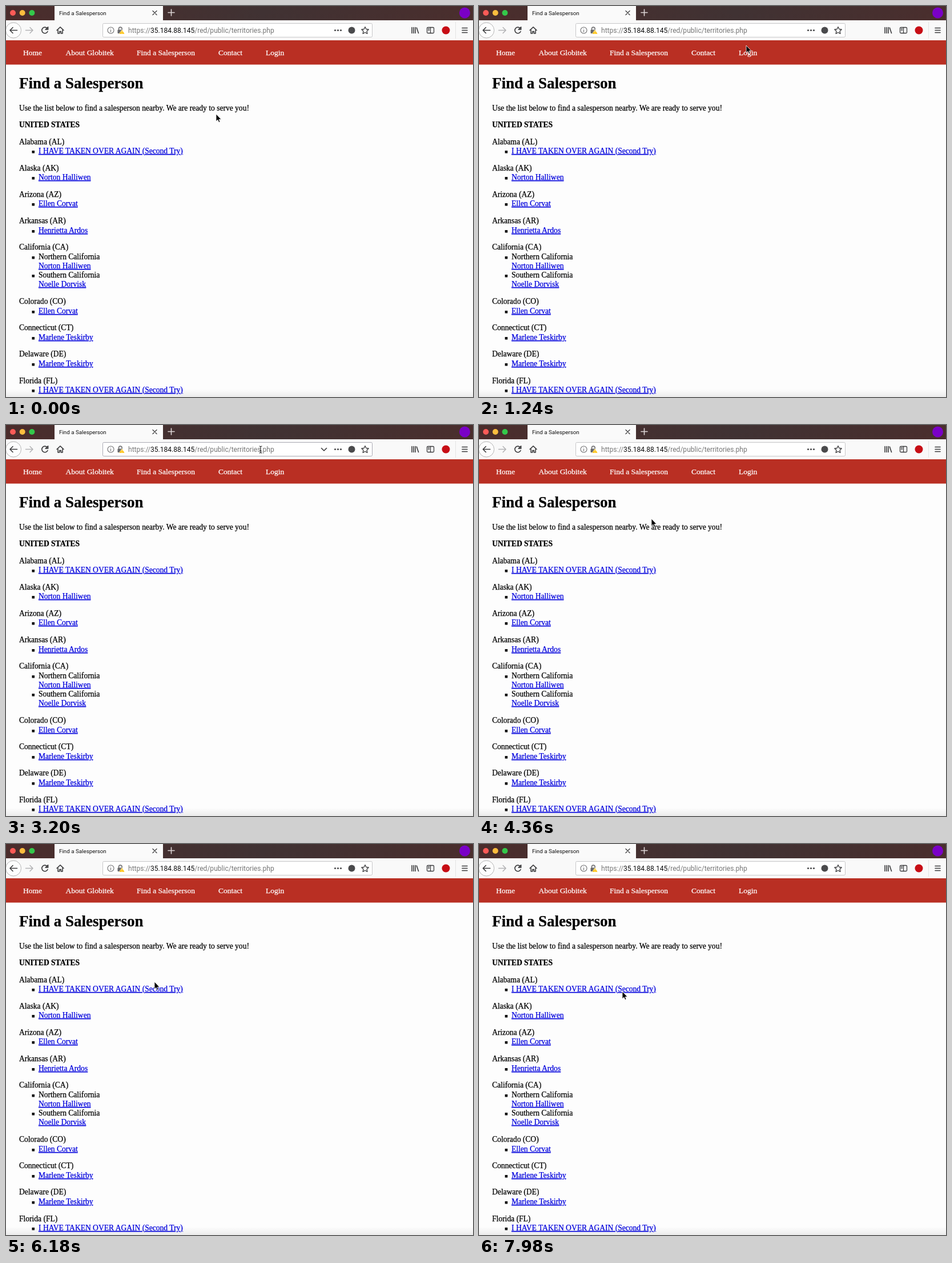
Animation of 818 by 684 pixels, one loop 8000 ms. Source, as an HTML page:

```html
<!DOCTYPE html>
<html lang="en">
<head>
<meta charset="utf-8">
<title>Find a Salesperson</title>
<style>
  html, body { margin: 0; width: 100%; height: 100%; overflow: hidden; background: #fdfdfd; }
  svg { display: block; }
  .ui { font-family: Roboto, sans-serif; }
  #page { font: 13.55px "Liberation Serif", serif; }
  #page text { stroke: #000; stroke-width: .25; }
  #page .menu { fill: #fff; stroke: #fff; font-size: 13.5px; }
  #page .link { fill: #0000dc; stroke: #0000dc; text-decoration: underline; }
  .icon { fill: none; stroke: #3c3c3e; stroke-width: 1.6; stroke-linecap: round; stroke-linejoin: round; }
  .thin { stroke-width: 1.3; }
</style>
</head>
<body>
<svg width="818" height="684" viewBox="0 0 818 684">
  <defs>
    <linearGradient id="titlebar">
      <stop offset="0" stop-color="#4b2d2c"/>
      <stop offset=".55" stop-color="#403233"/>
      <stop offset="1" stop-color="#4a2e2d"/>
    </linearGradient>
    <linearGradient id="bottomShade" x2="0" y2="1">
      <stop offset="0" stop-color="#fdfdfd"/>
      <stop offset="1" stop-color="#ebebeb"/>
    </linearGradient>
  </defs>
  <rect width="818" height="684" fill="#fdfdfd"/>
  <rect y="670" width="818" height="14" fill="url(#bottomShade)"/>

  <!-- Tab strip -->
  <rect width="818" height="25" fill="url(#titlebar)"/>
  <rect x="85" width="190" height="25" fill="#fafafa"/>
  <circle cx="12" cy="12" r="5" fill="#fc5b57"/>
  <circle cx="28.7" cy="12" r="5" fill="#fdbd3e"/>
  <circle cx="45.4" cy="12" r="5" fill="#34c84a"/>
  <text class="ui" x="93" y="15.5" font-size="9.8" fill="#111">Find a Salesperson</text>
  <path class="icon thin" d="M257 8.5l7 7m0-7l-7 7"/>
  <path class="icon" style="stroke:#ddd6d6" d="M284 11.5h11m-5.5-5.5v11"/>
  <circle cx="803.5" cy="12" r="9.5" fill="#7a00c6"/>

  <!-- Toolbar -->
  <rect y="25" width="818" height="35" fill="#f9f9f9"/>
  <circle cx="13" cy="42.5" r="13.5" fill="#fdfdfd" stroke="#b4b4b4"/>
  <path class="icon" d="M19.5 42.5H7m5-5l-5 5 5 5"/>
  <path class="icon" style="stroke:#b4b4b6" d="M34.5 42.5H47m-5-5l5 5-5 5"/>
  <path class="icon" d="M72.3 39.2A5.3 5.3 0 1 0 73 44.5M73.6 36.8v4.4h-4.4z"/>
  <path class="icon" d="M89 42.5l6-5.6 6 5.6M91 42v6h2.7v-3.4h2.6V48H99v-6"/>
  <rect id="urlBox" x="169.5" y="30.5" width="472" height="24" rx="2" fill="#fff" stroke="#c6c6c8"/>
  <g class="icon" style="stroke:#68686a;stroke-width:1.1">
    <circle cx="183.5" cy="42.5" r="5.5"/>
    <path d="M183.5 42v3.3m0-5.6v.1"/>
  </g>
  <path d="M197.5 42v-2.2a2.8 2.8 0 0 1 5.6 0V42" fill="none" stroke="#68686a" stroke-width="1.5"/>
  <rect x="195.5" y="41.5" width="8.5" height="6.5" rx="1" fill="#68686a"/>
  <path d="M203 41.5l5 7.5h-10z" fill="#ffbf00" stroke="#fff" stroke-width=".6"/>
  <path d="M203 44v2.3m0 1v.9" stroke="#fff"/>
  <text class="ui" x="214" y="47" font-size="12.05" fill="#777">https://<tspan fill="#0c0c0d">35.184.88.145</tspan>/red/public/territories.php</text>
  <path id="chevron" class="icon" d="M552.5 40.5l4.5 4.5 4.5-4.5"/>
  <g fill="#4a4a4c">
    <circle cx="576.5" cy="42.5" r="1.6"/>
    <circle cx="581.5" cy="42.5" r="1.6"/>
    <circle cx="586.5" cy="42.5" r="1.6"/>
    <circle cx="605.5" cy="42.5" r="6"/>
  </g>
  <path class="icon thin" d="M629 36.5l1.9 4 4.3.5-3.2 3 .9 4.4-3.9-2.2-3.9 2.2.9-4.4-3.2-3 4.3-.5z"/>
  <path class="icon" d="M711 37.5v10m3-10v10m3-10v10m2.3-9.5l3.2 9.5"/>
  <g class="icon thin">
    <rect x="737.5" y="37.5" width="12" height="10" rx="1.5"/>
    <path d="M743.5 37.5v10m-4-7.5h2m-2 2.3h2"/>
  </g>
  <circle cx="770.5" cy="42.5" r="7" fill="#c70d15"/>
  <path d="M787.5 28v29" stroke="#e3e3e4"/>
  <path class="icon" d="M799 38.5h9m-9 4h9m-9 4h9"/>

  <rect y="60" width="818" height="42.5" fill="#b92f23"/>
  <g id="page"></g>

  <path id="arrow" d="M0 0V12.8L2.9 10.1 4.9 14.5 7 13.6 5.1 9.4H9Z" stroke="#fff" stroke-width=".8"/>
  <path id="beam" d="M-2.5-6Q0-6 0-4.5Q0-6 2.5-6M0-4.5V4.5M-2.5 6Q0 6 0 4.5Q0 6 2.5 6M-1.5 2h3" fill="none" stroke="#222" stroke-width="1.1"/>
</svg>
<script>
const byId = id => document.getElementById(id);
const page = byId("page");

function add(tag, attributes, content = "") {
  const node = document.createElementNS(page.namespaceURI, tag);
  for (const name in attributes) node.setAttribute(name, attributes[name]);
  node.textContent = content;
  page.append(node);
}
const addText = (x, y, content, extra) => add("text", { x, y: Math.round(y), ...extra }, content);

const menu = [[30, "Home"], [104.5, "About Globitek"], [229, "Find a Salesperson"], [372, "Contact"], [455, "Login"]];
for (const [x, label] of menu) addText(x, 86, label, { class: "menu" });

addText(23, 144, "Find a Salesperson", { "font-size": 27, "font-weight": "bold" });
addText(23, 183, "Use the list below to find a salesperson nearby. We are ready to serve you!");
addText(23, 212, "UNITED STATES", { "font-weight": "bold" });

// Each entry: state, then its bullets; a bullet may hold a plain region line above its link.
const takenOver = "I HAVE TAKEN OVER AGAIN (Second Try)";
const states = [
  ["Alabama (AL)", [takenOver]],
  ["Alaska (AK)", ["Norton Halliwen"]],
  ["Arizona (AZ)", ["Ellen Corvat"]],
  ["Arkansas (AR)", ["Henrietta Ardos"]],
  ["California (CA)", ["Northern California", "Norton Halliwen"], ["Southern California", "Noelle Dorvisk"]],
  ["Colorado (CO)", ["Ellen Corvat"]],
  ["Connecticut (CT)", ["Marlene Teskirby"]],
  ["Delaware (DE)", ["Marlene Teskirby"]],
  ["Florida (FL)", [takenOver]]
];
const lineHeight = 16.25, gap = 13.6;
let y = 242;
for (const [state, ...bullets] of states) {
  addText(23, y, state);
  for (const lines of bullets) {
    add("rect", { x: 45.5, y: Math.round(y + lineHeight) - 5, width: 4.5, height: 4.5 });
    lines.forEach((line, i) => {
      y += lineHeight;
      addText(57, y, line, i === lines.length - 1 ? { class: "link" } : {});
    });
  }
  y += lineHeight + gap;
}

// Pointer path: time in ms, x, y
const path = [
  [0, 368, 189], [1240, 468, 69], [2260, 456, 54], [3200, 446, 43],
  [4360, 302, 164], [6180, 260, 241], [7980, 251, 258]
];
const duration = 8000;

function pointerAt(time) {
  const next = path.findIndex(point => point[0] > time);
  if (next < 0) return path.at(-1).slice(1);
  const [t0, x0, y0] = path[next - 1], [t1, x1, y1] = path[next];
  const u = (time - t0) / (t1 - t0), eased = u * u * (3 - 2 * u);
  return [x0 + (x1 - x0) * eased, y0 + (y1 - y0) * eased];
}

const show = (node, visible) => node.setAttribute("visibility", visible ? "visible" : "hidden");

function draw() {
  const [px, py] = pointerAt(performance.now() % duration);
  const overUrl = py < 55, typing = py < 52;
  show(byId("chevron"), overUrl);
  byId("urlBox").setAttribute("stroke", overUrl ? "#aaaab4" : "#c6c6c8");
  show(byId("arrow"), !typing);
  show(byId("beam"), typing);
  for (const id of ["arrow", "beam"]) byId(id).setAttribute("transform", `translate(${px} ${py})`);
  requestAnimationFrame(draw);
}
draw();
</script>
</body>
</html>
```
